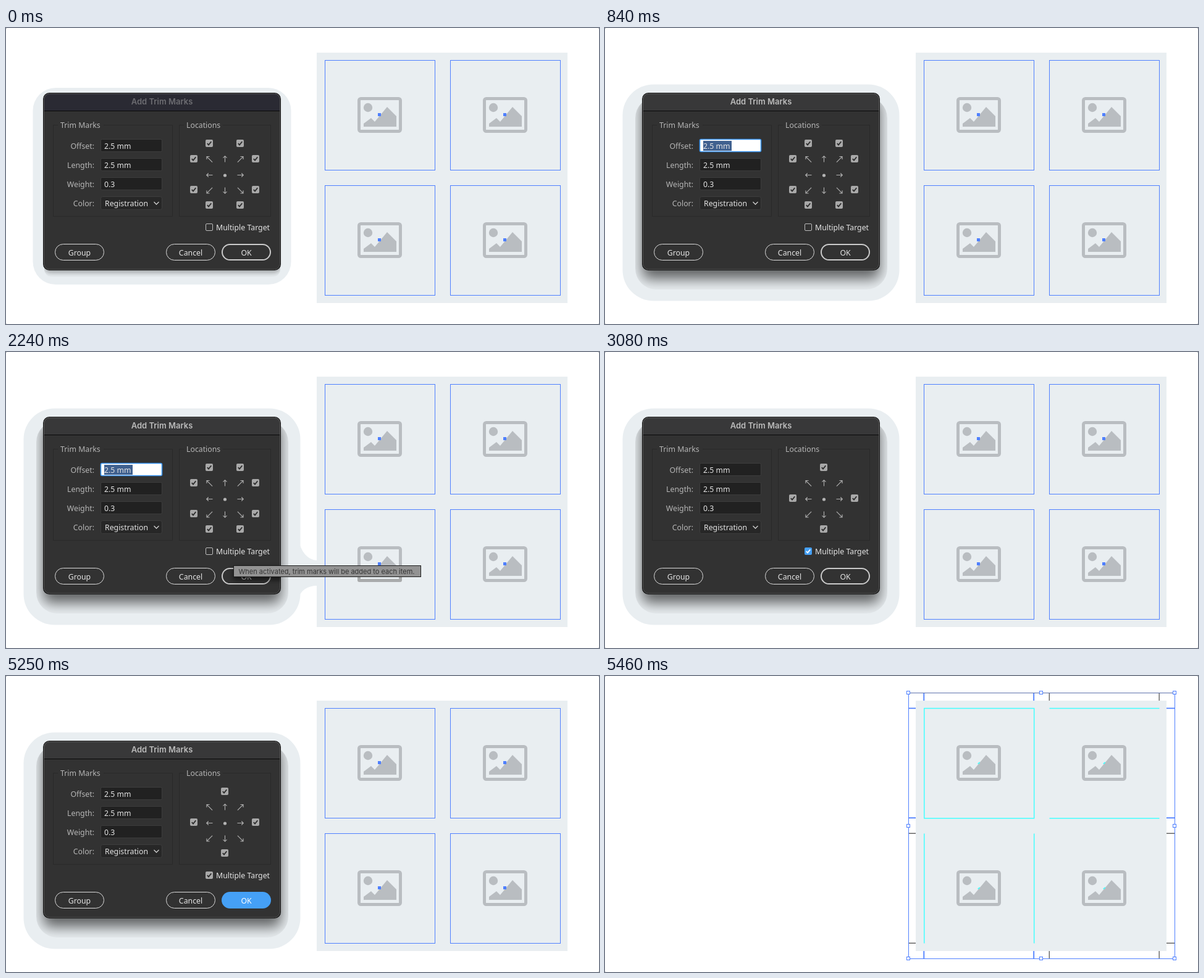
Animation of 960x480 px, one loop 7 s. Source, as an HTML page:

```html
<!DOCTYPE html>
<html lang="en">
<head>
<meta charset="utf-8">
<title>Add Trim Marks</title>
<style>
  html, body { margin: 0; width: 100%; height: 100%; overflow: hidden; background: #777; }
  svg { display: block; width: 100vw; height: 100vh; }
  text { font: 500 12.3px "Noto Sans", "Open Sans", sans-serif; fill: #e4e4e4; white-space: pre; }
  .label text { fill: #b6b6b6; }
  .end { text-anchor: end; }
  .mid { text-anchor: middle; }
  .title { font: 600 13px Inter, "Liberation Sans", sans-serif; text-anchor: middle; }
  .tip text { font: 400 11px Inter, "Liberation Sans", sans-serif; fill: #333; }
  .pale { fill: #e9eef1; }
  .field { fill: #212121; stroke: #3d3d3d; }
  .line { fill: none; stroke: #b3b3b3; stroke-width: 1.1; }
  .btn { fill: none; stroke: #dcdcdc; }
  .blue { fill: none; stroke: #4f80ff; }
  .grey { fill: none; stroke: #646464; }
  .cyan { fill: none; stroke: #4ff; stroke-width: 1.5; }

  /* one percent of the loop is 70 ms */
  .idle, .active, .dialog, .focus, .tip, .before, .after, .tick, .tock,
  .ok-line, .ok-mid, .ok-hover, .ok-down, .frames, .marks {
    animation: 7s step-end infinite;
  }
  .idle     { animation-name: idle; }
  .active   { animation-name: active; }
  .dialog   { animation-name: dialog; }
  .focus    { animation-name: focus; }
  .tip      { animation-name: tip; }
  .before   { animation-name: before; }
  .after    { animation-name: after; }
  .tick     { animation-name: tick; }
  .tock     { animation-name: down; }
  .ok-line  { animation-name: ok-line; }
  .ok-mid   { animation-name: ok-mid; }
  .ok-hover { animation-name: ok-hover; }
  .ok-down  { animation-name: down; }
  .frames   { animation-name: frames; }
  .marks    { animation-name: marks; }
  @keyframes idle     { 0% { opacity: 1 } 12% { opacity: 0 } }
  @keyframes active   { 0% { opacity: 0 } 12% { opacity: 1 } }
  @keyframes dialog   { 0% { opacity: 1 } 78% { opacity: 0 } }
  @keyframes focus    { 0% { opacity: 0 } 12% { opacity: 1 } 44% { opacity: 0 } }
  @keyframes tip      { 0% { opacity: 0 } 23% { opacity: 1 } 43% { opacity: 0 } }
  @keyframes before   { 0% { opacity: 1 } 44% { opacity: 0 } }
  @keyframes after    { 0% { opacity: 0 } 44% { opacity: 1 } }
  @keyframes tick     { 0% { opacity: 0 } 44% { opacity: 1 } 75% { opacity: 0 } }
  @keyframes down     { 0% { opacity: 0 } 75% { opacity: 1 } }
  @keyframes ok-line  { 0% { opacity: 1 } 49% { opacity: 0 } }
  @keyframes ok-mid   { 0% { opacity: 0 } 49% { opacity: 1 } 50% { opacity: 0 } }
  @keyframes ok-hover { 0% { opacity: 0 } 50% { opacity: 1 } 75% { opacity: 0 } }
  @keyframes frames   { 0% { opacity: 1 } 77% { opacity: 0 } }
  @keyframes marks    { 0% { opacity: 0 } 77% { opacity: 1 } }
</style>
</head>
<body>
<svg viewBox="0 0 960 480">
  <defs>
    <g id="image">
      <rect x="2.5" y="2.5" width="67" height="53" rx="3" fill="none" stroke="#b9bdc1" stroke-width="5"/>
      <circle cx="17" cy="17" r="7.2" fill="#b9bdc1"/>
      <path d="M10 48V43L22 34 28 40 48 16 63 31V48Z" fill="#b9bdc1"/>
    </g>
    <path id="tickmark" d="M-3.2 .2L-1 2.6 3.3-2.8" fill="none" stroke-width="1.8"/>
    <g id="box">
      <rect x="-6" y="-6" width="12" height="12" rx="2" fill="#a9a9a9"/>
      <use href="#tickmark" stroke="#2c2c2c"/>
    </g>
    <path id="arrow" class="line" d="M0 5V-4.6M-3-1.8L0-4.8 3-1.8"/>
    <path id="slant" class="line" d="M0 6.5V-6.2M-3.2-3.2L0-6.4 3.2-3.2"/>
    <rect id="tile" width="178" height="178" class="blue"/>
    <rect id="dot" x="-2.5" y="-2.5" width="5" height="5" fill="#4f80ff"/>
    <path id="spark" d="M-2 1L1.5-2 2 0-.5 2Z" fill="#4ff"/>
    <rect id="knob" x="-2.5" y="-2.5" width="5" height="5" fill="#fff" stroke="#4f80ff"/>
    <rect id="pill" x=".5" y=".5" width="79" height="26" rx="13"/>
    <filter id="soft" x="-30%" y="-30%" width="160%" height="160%"><feGaussianBlur stdDeviation="11"/></filter>
    <filter id="fine" x="-30%" y="-80%" width="160%" height="260%"><feGaussianBlur stdDeviation="4"/></filter>
    <clipPath id="core"><rect x="49" y="112" width="408" height="312" rx="34"/></clipPath>
    <clipPath id="rim"><rect x="62" y="370" width="382" height="34" rx="13"/></clipPath>
    <clipPath id="body"><rect x="61" y="106" width="383" height="286" rx="9"/></clipPath>
  </defs>

  <rect width="960" height="480" rx="1.5" fill="#fff"/>

  <!-- window shadow -->
  <g class="dialog">
    <g class="idle">
      <rect class="pale" x="43.5" y="97" width="418" height="319" rx="37"/>
      <g clip-path="url(#rim)"><rect x="62" y="120" width="382" height="277" rx="9" opacity=".32" filter="url(#fine)"/></g>
    </g>
    <g class="active">
      <rect class="pale" x="28.5" y="91.5" width="448" height="351" rx="50"/>
      <g clip-path="url(#core)"><rect x="60" y="118" width="385" height="289" rx="9" opacity=".6" filter="url(#soft)"/></g>
    </g>
    <path class="pale tip" d="M472 300Q480 337 504 338V379Q479 379 472 402Z"/>
  </g>

  <!-- artwork -->
  <rect class="pale" x="503" y="40" width="406" height="406"/>
  <use href="#image" x="569" y="112"/>
  <use href="#image" x="772" y="112"/>
  <use href="#image" x="569" y="315"/>
  <use href="#image" x="772" y="315"/>
  <g class="frames">
    <use href="#tile" x="516.5" y="52.5"/>
    <use href="#tile" x="719.5" y="52.5"/>
    <use href="#tile" x="516.5" y="255.5"/>
    <use href="#tile" x="719.5" y="255.5"/>
    <use href="#dot" x="604.5" y="140.5"/>
    <use href="#dot" x="807.5" y="140.5"/>
    <use href="#dot" x="604.5" y="343.5"/>
    <use href="#dot" x="807.5" y="343.5"/>
  </g>
  <g class="marks">
    <path class="cyan" d="M516.8 52.5H694.7V230.7H516.8ZM719.5 52.5H897.5M719.5 230.7H897.5M516.8 255.5V433.5M694.7 255.5V433.5"/>
    <use href="#spark" x="605" y="141"/>
    <use href="#spark" x="808" y="141"/>
    <use href="#spark" x="605" y="344"/>
    <use href="#spark" x="808" y="344"/>
    <path class="grey" stroke-width="1.4" d="M719.3 27V40M897.2 27V40M719.3 446V458M897.2 446V458M491 255.3H503M491 433.2H503M909 255.3H922M909 433.2H922"/>
    <path class="blue" stroke-width="1.8" d="M516.3 27V40M694.2 27V40M516.3 446V458M694.2 446V458M491 52.3H503M491 230.2H503M909 52.3H922M909 230.2H922"/>
    <path class="blue" d="M491.5 458.5V27.5M922.5 27.5V458.5H491.5"/>
    <path fill="none" stroke="#5d72ac" d="M491 27.5H923"/>
    <use href="#knob" x="491" y="27"/>
    <use href="#knob" x="706" y="27"/>
    <use href="#knob" x="922" y="27"/>
    <use href="#knob" x="491" y="243"/>
    <use href="#knob" x="922" y="243"/>
    <use href="#knob" x="491" y="458"/>
    <use href="#knob" x="706" y="458"/>
    <use href="#knob" x="922" y="458"/>
  </g>

  <!-- dialog -->
  <g class="dialog">
    <rect x="60" y="105" width="385" height="288" rx="10" fill="#0c0c0c"/>
    <rect x="61.5" y="106.5" width="382" height="285" rx="9" fill="#323232"/>
    <g clip-path="url(#body)">
      <rect class="idle" x="60" y="105" width="385" height="29" fill="#2a2a33"/>
      <rect class="active" x="60" y="105" width="385" height="29" fill="#383839"/>
      <rect x="60" y="134" width="385" height="1" fill="#080808"/>
    </g>
    <rect x="61.5" y="106.5" width="382" height="285" rx="9" fill="none" stroke="#6a6a6a" stroke-opacity=".75"/>
    <text class="title idle" x="252.5" y="124" style="fill:#6d6d72">Add Trim Marks</text>
    <text class="title active" x="252.5" y="124" style="fill:#bcbcbc">Add Trim Marks</text>

    <g fill="none" stroke="#292929">
      <path d="M84 157.5H76.5V305.5H269.5V157.5H158M288 157.5H280.5V305.5H428.5V157.5H351"/>
    </g>
    <g class="label">
      <text x="88" y="162">Trim Marks</text>
      <text x="292" y="162">Locations</text>
      <text class="end" x="143" y="196">Offset:</text>
      <text class="end" x="143" y="227">Length:</text>
      <text class="end" x="143" y="258">Weight:</text>
      <text class="end" x="143" y="289">Color:</text>
    </g>
    <rect class="field" x="153.5" y="180.5" width="99" height="20" rx="2"/>
    <rect class="field" x="153.5" y="211.5" width="99" height="20" rx="2"/>
    <rect class="field" x="153.5" y="242.5" width="99" height="20" rx="2"/>
    <rect class="field" x="153.5" y="273.5" width="99" height="21" rx="3" style="fill:#272727"/>
    <g class="focus">
      <rect x="153.5" y="180.5" width="99" height="20" rx="2" fill="#fff" stroke="#3b96f3" stroke-width="1.6"/>
      <rect x="159" y="183" width="46" height="16" fill="#40618f"/>
    </g>
    <text x="159" y="196">2.5 mm</text>
    <text x="159" y="227">2.5 mm</text>
    <text x="159" y="258">0.3</text>
    <text x="160" y="289">Registration</text>
    <path class="line" d="M239.5 282L243.5 286 247.5 282" style="stroke:#d0d0d0;stroke-width:1.3"/>

    <use href="#arrow" transform="translate(354.5 212.5)"/>
    <use href="#arrow" transform="translate(379.5 238.5) rotate(90)"/>
    <use href="#arrow" transform="translate(354.5 263.5) rotate(180)"/>
    <use href="#arrow" transform="translate(329.5 238.5) rotate(270)"/>
    <use href="#slant" transform="translate(379.5 213) rotate(45)"/>
    <use href="#slant" transform="translate(379.5 263.5) rotate(135)"/>
    <use href="#slant" transform="translate(329.5 263.5) rotate(225)"/>
    <use href="#slant" transform="translate(329.5 213) rotate(315)"/>
    <circle cx="354.5" cy="239" r="2.6" fill="#b3b3b3"/>

    <g class="before">
      <use href="#box" x="329" y="187"/>
      <use href="#box" x="379" y="187"/>
      <use href="#box" x="304" y="212"/>
      <use href="#box" x="404" y="212"/>
      <use href="#box" x="304" y="262"/>
      <use href="#box" x="404" y="262"/>
      <use href="#box" x="329" y="287"/>
      <use href="#box" x="379" y="287"/>
      <rect x="323.5" y="317.5" width="11" height="11" rx="1.5" fill="none" stroke="#bdbdbd"/>
    </g>
    <g class="after">
      <use href="#box" x="354" y="187"/>
      <use href="#box" x="304" y="237"/>
      <use href="#box" x="404" y="237"/>
      <use href="#box" x="354" y="287"/>
    </g>
    <g class="tick">
      <rect x="323" y="317" width="12" height="12" rx="2" fill="#45a0f6"/>
      <use href="#tickmark" x="329" y="323" stroke="#fff"/>
    </g>
    <use class="tock" href="#box" x="329" y="323"/>
    <text x="340" y="328">Multiple Target</text>

    <use href="#pill" class="btn" x="79" y="350"/>
    <text class="mid" x="119" y="369">Group</text>
    <use href="#pill" class="btn" x="259" y="350"/>
    <text class="mid" x="299" y="369">Cancel</text>
    <g class="ok-line">
      <rect class="btn" x="350" y="351" width="78" height="25" rx="12.5" style="stroke:#cacaca;stroke-width:2"/>
      <text class="mid" x="389" y="369">OK</text>
    </g>
    <g class="ok-mid">
      <rect x="350" y="351" width="78" height="25" rx="12.5" fill="#828282" stroke="#cacaca" stroke-width="2"/>
      <text class="mid" x="389" y="369">OK</text>
    </g>
    <g class="ok-hover">
      <rect x="349" y="350" width="80" height="27" rx="13.5" fill="#cacaca"/>
      <text class="mid" x="389" y="369" style="fill:#3a3a3a">OK</text>
    </g>
    <g class="ok-down">
      <rect x="349" y="350" width="80" height="27" rx="13.5" fill="#45a0f6"/>
      <text class="mid" x="389" y="369" style="fill:#fff">OK</text>
    </g>
  </g>

  <!-- tooltip -->
  <g class="tip">
    <g clip-path="url(#body)"><rect x="368" y="350" width="100" height="20" opacity=".55" filter="url(#fine)"/></g>
    <path d="M569 365H641V370Q641 373 638 373H572Q569 373 569 370Z" fill="#a9abac"/>
    <path class="pale" d="M574 364H636V368H574Z"/>
    <rect x="368.5" y="346.5" width="303" height="18" fill="#939393" stroke="#1c1c1c"/>
    <text x="376.5" y="360">When activated, trim marks will be added to each item.</text>
  </g>
</svg>
</body>
</html>
```
